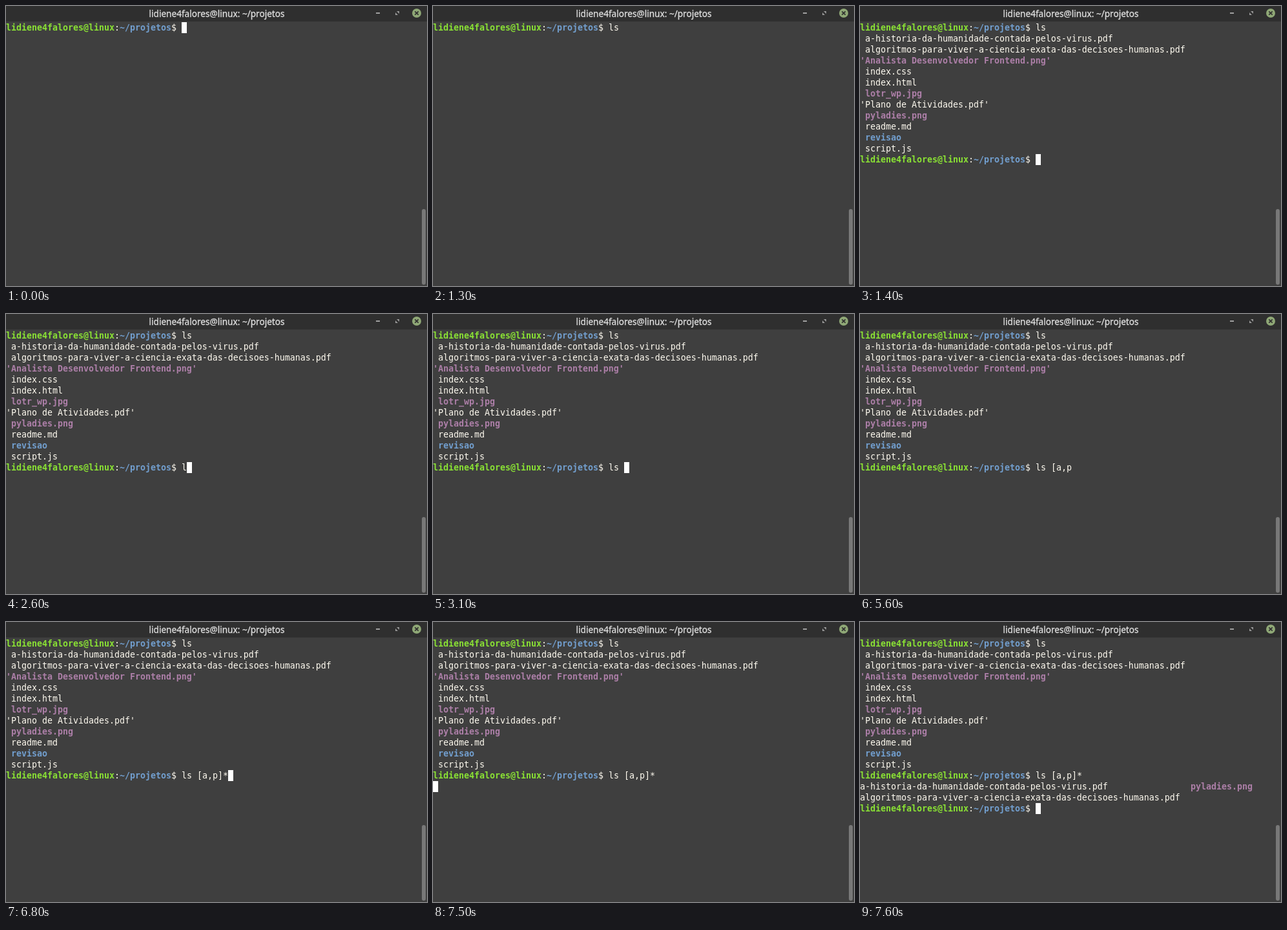
Recreate the animation shown at these times as an HTML page. Size 652 px wide and 433 px high, loop 8 s.

```html
<!DOCTYPE html>
<html lang="pt">
<head>
<meta charset="utf-8">
<title>Terminal</title>
<style>
  html, body { margin: 0; width: 100%; height: 100%; overflow: hidden; background: #3f3f3f; }
  svg { display: block; }
  text { white-space: pre; }
  #screen text { font: 13.29px "DejaVu Sans Mono", monospace; fill: #fffbf0; }
  #screen .user, #screen .dir, #screen .img { font-weight: bold; }
  #screen .user { fill: #8ae234; }
  #screen .dir { fill: #729fcf; }
  #screen .img { fill: #ad7fa8; }
  #title {
    font: 500 13.6px "Noto Sans", sans-serif; text-anchor: middle;
    fill: #dedede; stroke: #dedede; stroke-width: .3px;
  }
</style>
</head>
<body>
<svg width="652" height="433" viewBox="0 0 652 433">
  <rect width="652" height="433" fill="#3f3f3f"/>
  <rect width="652" height="24" fill="#2f2f2f"/>
  <text id="title" x="326.5" y="17"></text>
  <rect x="573" y="10" width="6" height="2" fill="#a0a0a0"/>
  <path d="M605 8h4v4zM603 10v4h4z" fill="#989898"/>
  <circle cx="636" cy="11" r="7" fill="#8fa876"/>
  <path d="M633.3 8.3l5.4 5.4m0-5.4l-5.4 5.4" stroke="#2f2f2f" stroke-width="1.7"/>
  <rect x="644" y="314" width="6" height="117" rx="3" fill="#787878"/>
  <g id="screen"></g>
  <rect id="cursor" width="8" height="17" fill="#fff"/>
</svg>
<script>
const NS = "http://www.w3.org/2000/svg";
const CELL = 8, ROW = 17, TOP = 25, ASCENT = 13, LOOP = 8000;
const HOST = "lidiene4falores@linux", DIR = "~/projetos";
const PROMPT_COLS = HOST.length + DIR.length + 3;

const FILES = [
  "a-historia-da-humanidade-contada-pelos-virus.pdf",
  "algoritmos-para-viver-a-ciencia-exata-das-decisoes-humanas.pdf",
  "Analista Desenvolvedor Frontend.png",
  "index.css",
  "index.html",
  "lotr_wp.jpg",
  "Plano de Atividades.pdf",
  "pyladies.png",
  "readme.md",
  "revisao",
  "script.js"
];

// "↓" moves to a new line, "⏎" prints the output and the next prompt.
const KEYS = "ls⏎ls [a,p]*↓⏎";
const KEY_TIMES = [600, 700, 1400, 2600, 2700, 3100, 3800, 4100, 4800, 5000, 6000, 6800, 7500, 7600];
const BLINK_OFF = [200, 1300, 2000, 3700, 5600, 7400];

const screen = document.getElementById("screen");
const cursor = document.getElementById("cursor");
document.getElementById("title").textContent = `${HOST}: ${DIR}`;

function put(parent, col, row, str, cls = "") {
  const el = document.createElementNS(NS, "text");
  el.setAttribute("x", col * CELL);
  el.setAttribute("y", TOP + row * ROW + ASCENT);
  el.setAttribute("class", cls);
  el.textContent = str;
  parent.append(el);
  return el;
}

const kind = name => /\.(png|jpg)$/.test(name) ? "img" : name.includes(".") ? "" : "dir";

// Lists names in columns, quoting those with spaces as ls does.
function list(parent, top, names, height) {
  const quoted = names.some(n => n.includes(" "));
  const width = Math.max(...names.map(n => n.length)) + 2;
  names.forEach((name, i) => {
    const spaced = name.includes(" ");
    const col = Math.floor(i / height) * width + (quoted && !spaced ? 1 : 0);
    put(parent, col, top + i % height, spaced ? `'${name}'` : name, kind(name));
  });
}

// A block is the output of the previous command plus a new prompt.
function block(top, names, height) {
  const g = document.createElementNS(NS, "g");
  screen.append(g);
  list(g, top, names, height);
  const row = top + height;
  put(g, 0, row, HOST, "user");
  put(g, HOST.length, row, ":");
  put(g, HOST.length + 1, row, DIR, "dir");
  put(g, PROMPT_COLS - 2, row, "$");
  return { g, row, input: put(g, PROMPT_COLS, row, "") };
}

const first = block(0, [], 0);
const second = block(first.row + 1, FILES, FILES.length);
const third = block(second.row + 1, FILES.filter(n => /^[ap]/.test(n)), 2);
const blocks = [first, second, third];

const lastBefore = (times, t) => times.findLast(x => x <= t) ?? -1;

function draw(t) {
  const pressed = KEY_TIMES.filter(x => x <= t).length;
  const typed = KEYS.slice(0, pressed).split("⏎");
  const active = typed.length - 1;
  blocks.forEach(({ g, input }, i) => {
    g.style.display = i <= active ? "" : "none";
    input.textContent = (typed[i] ?? "").replace("↓", "");
  });

  const line = typed[active];
  const below = line.endsWith("↓");
  const hidden = lastBefore(BLINK_OFF, t) > lastBefore(KEY_TIMES, t);
  cursor.style.display = hidden ? "none" : "";
  cursor.setAttribute("x", below ? 0 : (PROMPT_COLS + line.length) * CELL);
  cursor.setAttribute("y", TOP + (blocks[active].row + below) * ROW);
}

const start = performance.now();
function tick() {
  draw((performance.now() - start) % LOOP);
  requestAnimationFrame(tick);
}
draw(0);
requestAnimationFrame(tick);
</script>
</body>
</html>
```
